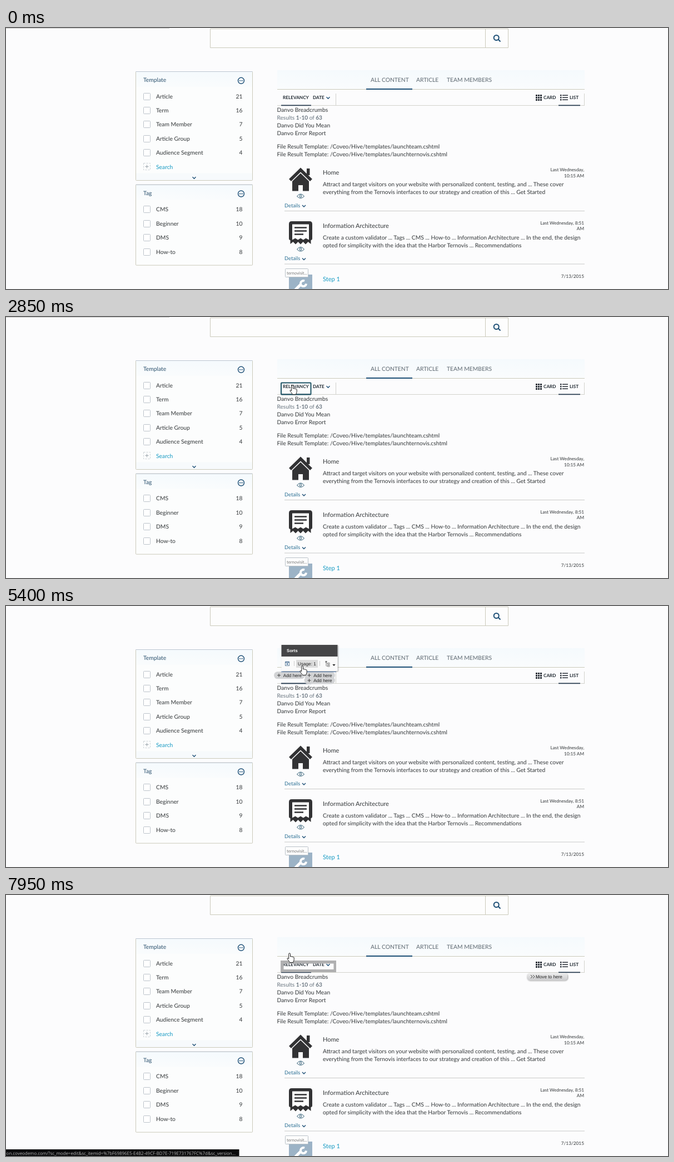
These frames come from a looping animation (1191x470 px, 8 s). An HTML page:

```html
<!DOCTYPE html>
<html lang="en">
<head>
<meta charset="utf-8">
<title>Search page editor</title>
<style>
html, body { margin: 0; width: 100%; height: 100%; overflow: hidden; background: #fcfcfd; }
svg { display: block; width: 1191px; height: 470px; font: 10.32px Lato, sans-serif; fill: #333739; text-rendering: geometricPrecision; }
.ui { font-family: "Liberation Sans", Arial, sans-serif; font-size: 8.2px; fill: #222; }
.url { font-family: "Open Sans", sans-serif; font-size: 7.9px; fill: #b9b9b9; }
.line { fill: none; stroke: #1d4f76; stroke-width: 1.4; }
</style>
</head>
<body>
<svg id="stage" viewBox="0 0 1191 470"></svg>
<script>
const NAVY = '#1d4f76', TAN = '#cbcabb', TEAL = '#1f5566', INK = '#323234';

const text = (x, y, s, attrs = '') => `<text x="${x}" y="${y}" ${attrs}>${s}</text>`;
const right = (x, y, s, attrs = '') => text(x, y, s, `text-anchor="end" ${attrs}`);
const rect = (x, y, w, h, fill, attrs = '') =>
  `<rect x="${x}" y="${y}" width="${w}" height="${h}" fill="${fill}" ${attrs}/>`;
const box = (x, y, w, h, stroke, width = 1, attrs = '') =>
  rect(x, y, w, h, 'none', `stroke="${stroke}" stroke-width="${width}" ${attrs}`);
const path = (d, attrs = 'class="line"') => `<path d="${d}" ${attrs}/>`;
const group = (id, body) => `<g id="${id}" visibility="hidden">${body}</g>`;
const chevron = (x, y) => path(`M${x - 3} ${y - 1.5}l3 3 3-3`);
const size = n => `font-size="${n}"`;

// Facet panels
function facet(top, height, title, rows, more) {
  let s = rect(233.5, top, 210, height, '#fcfdfd', `stroke="${TAN}" rx="1"`) +
    rect(234, top + .5, 209, 27, 'url(#head)') +
    path(`M233.5 ${top}h210`, 'stroke="#bcc5d2"') +
    text(247, top + 18.5, title, 'fill="#2b516d"') +
    `<circle cx="423" cy="${top + 16.3}" r="5.5" class="line"/>` +
    [-2.6, 0, 2.6].map(d => `<circle cx="${423 + d}" cy="${top + 16.3}" r=".9" fill="${NAVY}"/>`).join('');
  rows.forEach(([name, count], i) => {
    const y = top + 44 + i * 25.45;
    s += rect(247.5, Math.round(y - 6) + .5, 12, 12, '#fff', 'stroke="#bcc3ca" rx="1"') +
      text(270, y + 4, name) + right(425.5, y + 4, count);
  });
  if (more) {
    const y = top + 171.5;
    s += rect(234, top + height - 13, 209, 12.5, '#f7fafc') +
      box(247.5, y - 6.5, 12, 12, '#ccd2d6', 1, 'stroke-dasharray="3 2"') +
      path(`M250.5 ${y - .5}h6m-3-3v6`, 'stroke="#9aa5ac"') +
      text(270, y + 4, 'Search', 'fill="#1499c2"') + chevron(338.5, top + 191.3);
  }
  return s;
}

// One search result; icons are drawn for the first row and shifted
function result(dy, icon, title, lines, date) {
  return `<g transform="translate(0 ${dy})">` + icon +
    path('M523.5 303q6.5-8 13 0q-6.5 7-13 0z', 'fill="none" stroke="#28576f"') +
    '<circle cx="530" cy="302.7" r="1.9" fill="none" stroke="#28576f"/>' +
    text(570, 264, title, size(11)) +
    lines.map((l, i) => text(570, 285.4 + i * 13.8, l)).join('') +
    date.map((l, i) => right(1040, 258.4 + i * 10.3, l, size(8.2))).join('') +
    text(501, 322.6, 'Details', size(9.3) + ' fill="#2a6f94"') + chevron(536, 320.5) +
    path('M501 329.5h540', 'stroke="#c9cac8"') + '</g>';
}

const house = path('M511 274L530 255.5L549 274', `fill="none" stroke="${INK}" stroke-width="5.6"`) +
  rect(541, 253, 5.5, 12, INK) +
  path('M515 276L530 261.5L545 276V293.5H534V283H526V293.5H515z', `fill="${INK}"`);

const receipt = path('M514 252.5h32q5 0 5 5v26q0 3-2.5 3v7l-5-4-4.5 4.5-4.5-4.5-4.5 4.5-4.5-4.5-4.5 4.5-4.5-4.5-5 4v-7q-2.5 0-2.5-3v-26q0-5 5-5z', `fill="${INK}"`) +
  path('M515 258h30v28l-5.5-3-4.7 3-4.8-3-4.8 3-4.7-3-5.5 3z', 'fill="#fff"') +
  path('M519 264h22m-22 6h22m-22 6h16', `stroke="${INK}" stroke-width="2.4"`);

function page() {
  let s = path('M367.5 1.5h536v34h-536zM862.5 1.5v34', `fill="#fdfdfd" stroke="${TAN}"`) +
    path('M886 21l3.5 3.5M886.7 17.5a4.5 4.5 0 1 1-9 0a4.5 4.5 0 1 1 9 0', 'class="line" style="stroke-width:2"') +
    facet(78.5, 196, 'Template', [['Article', 21], ['Term', 16], ['Team Member', 7],
      ['Article Group', 5], ['Audience Segment', 4]], true) +
    facet(282.2, 145, 'Tag', [['CMS', 18], ['Beginner', 10], ['DMS', 9], ['How-to', 8]]);

  s += rect(488, 76, 553, 34, 'url(#head)') + path('M488 110.5h553', `stroke="${TAN}"`) +
    rect(648, 109, 83, 2, NAVY) +
    [[656, 'ALL CONTENT'], [738, 'ARTICLE'], [793, 'TEAM MEMBERS']]
      .map(([x, t]) => text(x, 97, t, 'fill="#5d6870"')).join('');

  s += path('M488 139.5h553M593.5 118v21M1040.5 118v21', 'stroke="#d2d2cc" fill="none"') +
    rect(495, 138.5, 54, 1.7, '#23374a') + rect(994, 138.5, 39, 1.7, '#23374a') +
    '<g font-weight="bold" font-size="8.2" fill="#222b33">' +
    text(498, 128, 'RELEVANCY') + text(552, 128, 'DATE') +
    text(967, 128, 'CARD') + text(1014, 128, 'LIST') + '</g>' + chevron(579.5, 125.7);
  for (let r = 0; r < 3; r++) {
    const y = 120 + r * 4;
    for (let c = 0; c < 3; c++) s += rect(953 + c * 4, y, 3, 3, '#2a3038');
    s += rect(997, y, 2.5, 2.5, '#2a3038') + rect(1001, y + .5, 10, 1.5, '#2a3038');
  }

  s += text(487.5, 151, 'Danvo Breadcrumbs') +
    text(487.5, 165, 'Results <tspan font-weight="bold">1-10</tspan> of <tspan font-weight="bold">63</tspan>',
      size(10.1) + ' fill="#6a7680"') +
    text(487.5, 179, 'Danvo Did You Mean') + text(487.5, 193, 'Danvo Error Report') +
    text(487.5, 217, 'File Result Template: /Coveo/Hive/templates/launchteam.cshtml') +
    text(487.5, 231, 'File Result Template: /Coveo/Hive/templates/launchternovis.cshtml');

  s += result(0, house, 'Home', [
    'Attract and target visitors on your website with personalized content, testing, and ... These cover',
    'everything from the Ternovis interfaces to our strategy and creation of this ... Get Started'],
    ['Last Wednesday,', '10:15 AM']) +
    result(95.5, receipt, 'Information Architecture', [
    'Create a custom validator ... Tags ... CMS ... How-to ... Information Architecture ... In the end, the design',
    'opted for simplicity with the idea that the Harbor Ternovis ... Recommendations'],
    ['Last Wednesday, 8:51', 'AM']);

  return s + rect(509, 444, 42, 26, '#9cb3c6') +
    path('M520 472L531 461', 'stroke="#fff" stroke-width="5"') +
    path('M537 455.5a5 5 0 1 0 3 5', 'fill="none" stroke="#fff" stroke-width="4"') +
    rect(502.5, 433.5, 41, 15, '#fdfdfd', 'stroke="#b9c1c8" rx="1"') +
    text(505, 444, 'ternovisit...', size(7.6) + ' fill="#777"') +
    text(570, 455.7, 'Step 1', size(11) + ' fill="#1499c2"') +
    right(1040, 450, '7/13/2015', size(8.3));
}

// Floating toolbars
const bar = (x, y, w, title) =>
  rect(x, y, w, 47, '#fafafa', 'filter="url(#drop)"') + rect(x, y, w, 21, '#454547') +
  text(x + 9.5, y + 13.3, title, 'font-weight="bold" font-size="7.7" style="fill:#fff"');
const seps = (y, ...xs) => xs.map(x => rect(x, y, 1, 9, '#ccc')).join('');
const arrow = (x, y) => path(`M${x - 2.7} ${y}h5.4l-2.7 3z`, 'fill="#222"');
const tree = (x, y) => path(`M${x - 2} ${y - 4}v8h4m-4-4h4`, 'fill="none" stroke="#888"') +
  rect(x - 3.5, y - 5, 3, 3, '#777') + box(x + 1, y - 1.5, 3, 2.5, '#888') + box(x + 1, y + 2.5, 3, 2.5, '#888');

const sortBar = '<g class="ui">' + bar(486, 68, 319, 'Danvo Relevancy Sort') +
  path('M492 97v10l8-4z', 'fill="#e57a1d"') +
  '<circle cx="496.5" cy="102" r="2.3" fill="#fff" stroke="#444"/>' + path('M498 104l3 3', 'stroke="#444" stroke-width="1.5"') +
  seps(97, 508, 583, 613, 685, 733, 764) +
  box(517.5, 97.5, 7, 9, '#7d858c') + path('M519 100l4 4m0-4l-4 4', 'stroke="#777"') +
  '<circle cx="535.5" cy="99" r="2" fill="#3976b5"/><circle cx="541" cy="99" r="2" fill="#c14438"/>' +
  rect(533.5, 102, 4, 5, '#c14438') + rect(539.5, 102, 4, 5, '#3976b5') +
  box(551.5, 97.5, 7, 5, '#666') + rect(549.5, 100.5, 7, 6, '#fff', 'stroke="#666"') +
  path('M568 98.5l6 7m0-7l-6 7', 'stroke="#d3271c" stroke-width="2.4"') +
  rect(592, 97, 8, 9, '#f0c25a') + path('M593 101l2.5 3 5-6', 'fill="none" stroke="#2d6cb0" stroke-width="1.8"') +
  arrow(605.5, 102.5) + text(621, 105, 'Workflow: No') + text(692, 105, 'Usage: 2') +
  tree(745, 102) + arrow(757.5, 102.5) + text(771, 105, 'More') + arrow(797, 101) + '</g>';

const groupBar = '<g class="ui">' + bar(495.5, 70, 101, 'Sorts') +
  '<rect id="hot" y="97" height="14" fill="#dcdcdc"/>' +
  box(502.5, 100.5, 7, 7, '#66859f') + rect(502, 100, 8, 2, '#56789a') +
  '<circle cx="506" cy="104.5" r="1.4" fill="#3d6e9d"/>' +
  seps(99, 518, 564) + text(525, 107, 'Usage: 1') + tree(578, 104) + arrow(590, 105) + '</g>';

const chip = (x, y) => rect(x, y, 55.5, 13, '#d2d3d5', 'rx="6.5"') +
  path(`M${x + 6} ${y + 6.5}h6m-3-3v6`, 'stroke="#444"') + text(x + 16.8, y + 9.8, 'Add here');
const chips = '<g class="ui">' + rect(495, 119, 98, 20, '#fcfcfd') + rect(495, 138.5, 54, 1.7, '#23374a') +
  chip(482, 118.3) + chip(536.5, 127.5) + chip(536.5, 118.3) + '</g>' +
  path('M495 118.5h99', 'stroke="#5e8cc4"');

const moveMode =
  path('M494 118h100v21h-100zM499.5 123.5v10.5h90v-10.5z', 'fill="#b0b0b1" fill-rule="evenodd"') +
  '<g class="ui">' + rect(937, 140.5, 73, 13, 'url(#pill)', 'rx="5" filter="url(#drop)"') +
  path('M944 144l3 3-3 3m4-6l3 3-3 3', 'fill="none" stroke="#444"') + text(953, 150, 'Move to here') + '</g>';

const hand = path('M-1.3 10V1.2a1.4 1.4 0 0 1 2.8 0V6c.8-1 2.3-.7 2.4.4.8-.8 2.2-.5 2.3.6.8-.6 2-.2 2 1v3.5c0 2.5-1.5 2.5-1.5 5H.5C-.3 14-3.5 11.5-4 9.6c-.3-1.2 1.2-1.8 2.7.4z',
  'fill="#fff" stroke="#222" stroke-linejoin="round"');

const stage = document.getElementById('stage');
stage.innerHTML = `<defs>
  <linearGradient id="head" x2="0" y2="1"><stop stop-color="#f5fafd"/><stop offset="1" stop-color="#fafcfd"/></linearGradient>
  <linearGradient id="pill" x2="0" y2="1"><stop stop-color="#eee"/><stop offset="1" stop-color="#cbcbcd"/></linearGradient>
  <filter id="drop" x="-10%" y="-20%" width="120%" height="150%"><feDropShadow dx="1" dy="1" stdDeviation="1.2" flood-opacity=".4"/></filter>
</defs>` + page() +
  group('shade', rect(0, 0, 294, 1, '#c9c9c9')) +
  group('frame', box(478, 69, 570, 420, TEAL, 1.8, 'rx="2"')) +
  group('ghost', box(485.5, 113.5, 77, 53, '#93a0b8')) +
  group('picked', box(494.5, 118.5, 54.5, 21, '#6b93cc', 1.3)) +
  group('overRel', box(495, 118.5, 53.5, 21, TEAL, 2, 'rx="1"')) +
  group('overDate', box(549.5, 118.5, 37.5, 21, TEAL, 2, 'rx="1"')) +
  group('sortBar', sortBar) +
  group('thick', box(495, 118.5, 98.5, 21, TEAL, 1.8)) +
  group('chips', chips) +
  group('outline', box(495, 118.5, 98.5, 21, TEAL, 1.8)) +
  group('groupBar', groupBar) +
  group('moveMode', moveMode) +
  group('status', rect(0, 458, 419.5, 12, '#0b0b0c') +
    right(413, 467.5, 'on.coveodemo.com/?sc_mode=edit&amp;sc_itemid=%7bF69896E5-E4B2-49CF-BD7E-719E731767FC%7d&amp;sc_version...', 'class="url"')) +
  group('hand', hand);
document.getElementById('thick').remove();

// Pointer stops: time, x, y
const STOPS = [[500, 4, 300], [1050, 484, 115], [1350, 484, 115], [2300, 515, 123], [3300, 515, 123],
  [3650, 567, 122], [3950, 567, 122], [4500, 495, 103], [4900, 496, 104], [5400, 533, 108],
  [5800, 535, 108], [6500, 585, 104], [7000, 585, 104], [7400, 507, 104], [7700, 507, 104], [7950, 510, 105]];

function pointer(t) {
  const i = STOPS.findIndex(s => s[0] > t);
  if (i === 0) return [-50, -50];
  if (i < 0) return STOPS[STOPS.length - 1].slice(1);
  const [a, b] = [STOPS[i - 1], STOPS[i]];
  const k = (t - a[0]) / (b[0] - a[0]), e = k * k * (3 - 2 * k);
  return [a[1] + (b[1] - a[1]) * e, a[2] + (b[2] - a[2]) * e];
}

const el = id => document.getElementById(id);
const show = (id, on) => el(id).setAttribute('visibility', on ? 'visible' : 'hidden');

function draw(t) {
  const [x, y] = pointer(t);
  const during = (a, b) => t >= a && t < b;
  const onRow = y > 118 && y < 140 && t < 4700;
  const overRel = onRow && x > 495 && x < 549;
  const groupOn = during(4700, 7550);

  show('shade', t < 3200);
  show('frame', during(950, 1750) && !overRel);
  show('overRel', overRel);
  show('overDate', onRow && x >= 549 && x < 587);
  show('picked', during(3200, 4700));
  show('sortBar', during(3200, 4700));
  show('ghost', during(3200, 3950));
  show('chips', groupOn);
  show('groupBar', groupOn);
  show('outline', during(5600, 7550));
  show('moveMode', t >= 7550);
  show('status', t >= 5600);
  show('hand', t >= 500);
  el('hand').setAttribute('transform', `translate(${x.toFixed(1)} ${y.toFixed(1)})`);

  const [hx, hw] = x > 569 ? [569, 25] : x > 522 && x < 561 ? [522, 39] : x < 514 ? [499, 15] : [0, 0];
  el('hot').setAttribute('x', hx);
  el('hot').setAttribute('width', hw);
}

const start = performance.now();
function tick() {
  const t = (performance.now() - start) % 8000;
  draw(Math.floor(t / 50) * 50);
  requestAnimationFrame(tick);
}
tick();
</script>
</body>
</html>
```
